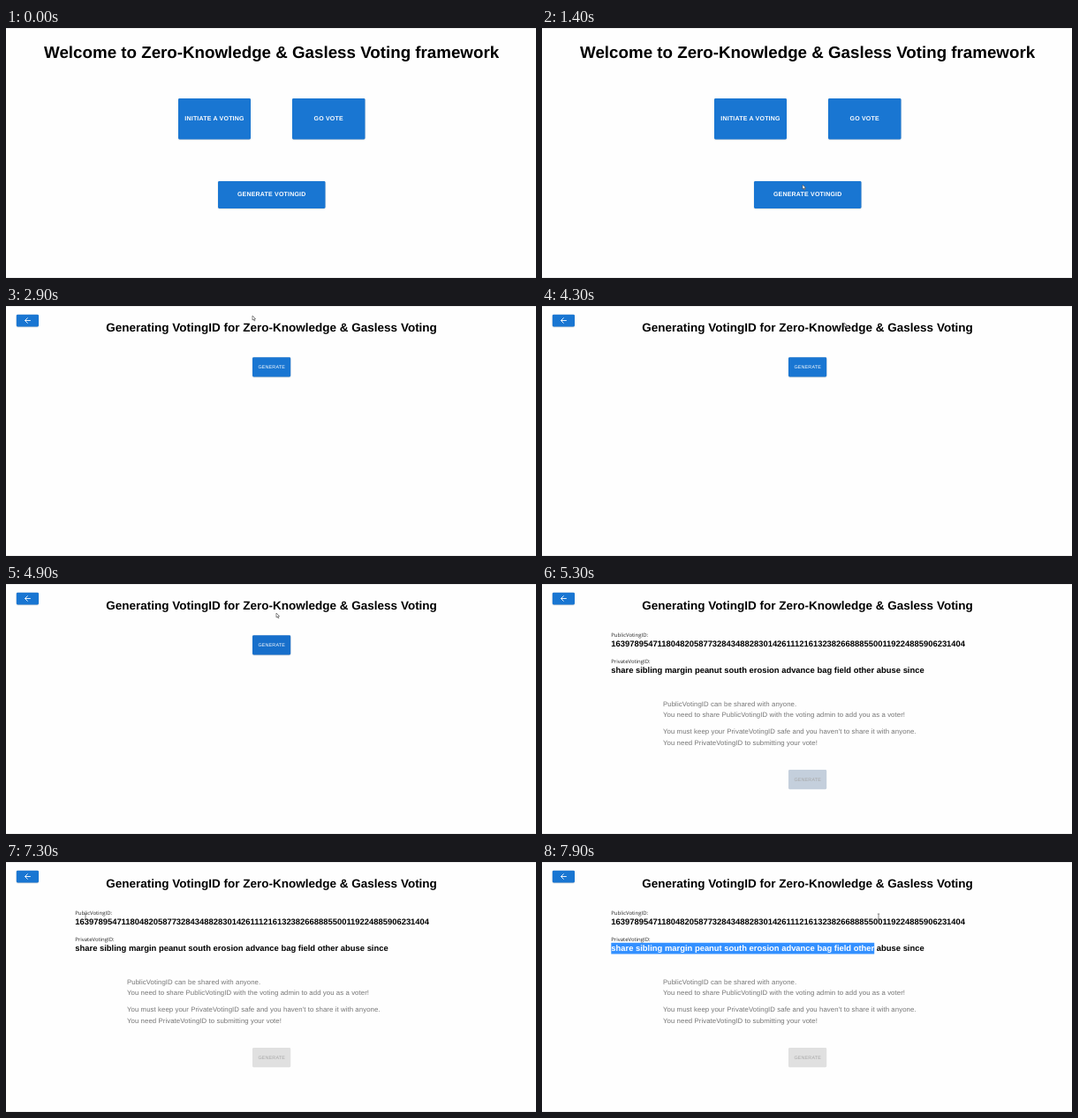
Animation of 600x284 px, one loop 8000 ms. Source, as an HTML page with a canvas:

```html
<!DOCTYPE html>
<html lang="en">
<head>
<meta charset="utf-8">
<style>
  html, body { margin: 0; width: 100%; height: 100%; overflow: hidden; background: #fefefe; }
  canvas { display: block; }
</style>
</head>
<body>
<canvas id="stage" width="600" height="284"></canvas>
<script>
const ctx = document.getElementById('stage').getContext('2d');
const LOOP = 8000, STEP = 100;
const OPEN_PAGE = 2500, GENERATED = 5130;
const SANS = '"Liberation Sans", Arial, sans-serif';
const LABEL = '"Open Sans", sans-serif';
const BLUE = [25, 118, 210], HOVER = [21, 101, 192], DISABLED = [224, 224, 224];
const PUBLIC_ID = '16397895471180482058773284348828301426111216132382668885500119224885906231404';
const PRIVATE_ID = 'share sibling margin peanut south erosion advance bag field other abuse since';

// Pointer keys: [time, x, y]; each list is one visible stretch.
const pointerPaths = [
  [[500, 503, 126], [800, 390, 150], [1100, 270, 182], [1300, 295, 178], [1400, 295, 178],
   [1700, 378, 142], [2000, 300, 150], [2500, 300, 150], [2900, 279, 11],
   [3200, 282, 14], [3400, 240, 20], [3600, 180, -8]],
  [[4300, 342, 19], [4600, 322, 28], [4900, 306, 33], [5200, 300, 32]],
  [[6000, 95, 30], [6100, 110, 30], [6400, 308, 30], [6700, 482, 30], [7000, 482, 32],
   [7300, 90, 62], [7400, 92, 62], [7900, 381, 62], [8000, 420, 62]]
];

const clamp01 = v => Math.max(0, Math.min(1, v));
const mix = (a, b, k) => a.map((v, i) => v + (b[i] - v) * k);
const rgb = c => `rgb(${c.map(Math.round).join(',')})`;
const easeOut = k => 1 - (1 - k) ** 2;

function text(str, x, y, font, color, align = 'left', spacing = 0) {
  ctx.font = font;
  ctx.letterSpacing = spacing + 'px';
  ctx.textRendering = 'geometricPrecision';
  ctx.fillStyle = color;
  ctx.textAlign = align;
  ctx.save();
  ctx.translate(x, y);
  ctx.rotate(1e-4); // an imperceptible turn keeps small glyphs unhinted
  ctx.fillText(str, 0, 0);
  ctx.restore();
}

function button(x, y, w, h, color, shadow = true) {
  ctx.save();
  if (shadow) {
    ctx.shadowColor = 'rgba(0,0,0,0.2)';
    ctx.shadowBlur = 1.5;
    ctx.shadowOffsetY = 0.4;
  }
  ctx.fillStyle = rgb(color);
  ctx.beginPath();
  ctx.roundRect(x, y, w, h, 1.4);
  ctx.fill();
  ctx.restore();
}

function caption(str, x, y, size, weight = '', color = '#fff') {
  text(str, x, y, `${weight} ${size}px ${SANS}`, color, 'center', size * 0.02857);
}

function backButton() {
  button(11.8, 9.7, 25.2, 13.8, BLUE);
  ctx.strokeStyle = '#fff';
  ctx.lineWidth = 0.9;
  ctx.beginPath();
  ctx.moveTo(27.8, 16.5);
  ctx.lineTo(21.5, 16.5);
  ctx.moveTo(24.6, 13.4);
  ctx.lineTo(21.5, 16.5);
  ctx.lineTo(24.6, 19.6);
  ctx.stroke();
}

function selectable(str, y, count) {
  const x = 78.3, font = `bold 9.41px ${SANS}`;
  text(str, x, y, font, '#000');
  if (count <= 0) return;
  const width = ctx.measureText(str.slice(0, count)).width;
  ctx.save();
  ctx.fillStyle = '#3390ff';
  ctx.beginPath();
  ctx.rect(x, y - 9.5, width, 12.6);
  ctx.fill();
  ctx.clip();
  text(str, x, y, font, '#fff');
  ctx.restore();
}

function homePage(t) {
  text('Welcome to Zero-Knowledge & Gasless Voting framework', 300.6, 34.3,
    `bold 18.75px ${SANS}`, '#000', 'center');
  button(195, 80, 82, 46.5, BLUE);
  caption('INITIATE A VOTING', 236, 105.3, 7, 'bold');
  button(324, 80, 82.5, 46.5, BLUE);
  caption('GO VOTE', 365.2, 105.3, 7, 'bold');
  button(240, 174, 121.5, 31, mix(BLUE, HOVER, clamp01((t - 1900) / 250)));
  caption('GENERATE VOTINGID', 300.7, 191.4, 7, 'bold');
}

function results(t) {
  const publicCount = t < 7200 ? Math.round(clamp01((t - 6100) / 570) * PUBLIC_ID.length) : 0;
  const privateCount = Math.round(clamp01((t - 7400) / 500) * 65);
  text('PublicVotingID:', 78.3, 60, `5.95px ${LABEL}`, '#222');
  selectable(PUBLIC_ID, 71, publicCount);
  text('PrivateVotingID:', 78.3, 90.2, `5.95px ${LABEL}`, '#222');
  selectable(PRIVATE_ID, 101.3, privateCount);
  [
    ['PublicVotingID can be shared with anyone.', 138.5],
    ['You need to share PublicVotingID with the voting admin to add you as a voter!', 151],
    ["You must keep your PrivateVotingID safe and you haven't to share it with anyone.", 170],
    ['You need PrivateVotingID to submitting your vote!', 182.5]
  ].forEach(([line, y]) => text(line, 137, y, `7.8px ${SANS}`, '#757575', 'left', 0.073));
}

function generatePage(t) {
  const done = t >= GENERATED;
  const fade = done ? easeOut(clamp01((t - GENERATED) / 270)) : 0;
  const hover = clamp01((t - 4800) / 250);
  const y = done ? 211 : 58.3;
  backButton();
  text('Generating VotingID for Zero-Knowledge & Gasless Voting', 300.6, 29.3,
    `bold 13.5px ${SANS}`, '#000', 'center');
  if (done) results(t);
  button(279, y, 43.2, 22.2, mix(mix(BLUE, HOVER, hover), DISABLED, fade), !done);
  caption('GENERATE', 300.7, y + 12.8, 5.4, '', done ? '#a6a6a6' : '#fff');
}

function pointerAt(t) {
  const path = pointerPaths.find(p => t >= p[0][0] && t <= p[p.length - 1][0]);
  if (!path) return null;
  const i = Math.max(1, path.findIndex(k => k[0] >= t));
  const [a, b] = [path[i - 1], path[i]];
  return mix(a, b, (t - a[0]) / (b[0] - a[0])).slice(1);
}

function pointer(t) {
  const p = pointerAt(t);
  if (!p) return;
  const [x, y] = p;
  ctx.lineWidth = 0.7;
  ctx.strokeStyle = '#555';
  ctx.beginPath();
  if (t >= 6000) {
    ctx.moveTo(x - 1.2, y - 3);
    ctx.lineTo(x + 1.2, y - 3);
    ctx.moveTo(x, y - 3);
    ctx.lineTo(x, y + 3);
    ctx.moveTo(x - 1.2, y + 3);
    ctx.lineTo(x + 1.2, y + 3);
  } else {
    ctx.moveTo(x, y);
    ctx.lineTo(x, y + 5);
    ctx.lineTo(x + 1.2, y + 4);
    ctx.lineTo(x + 2.2, y + 6);
    ctx.lineTo(x + 2.9, y + 5.6);
    ctx.lineTo(x + 2.1, y + 3.7);
    ctx.lineTo(x + 3.6, y + 3.6);
    ctx.closePath();
    ctx.fillStyle = '#fff';
    ctx.fill();
  }
  ctx.stroke();
}

function draw(now) {
  const t = Math.floor((now % LOOP) / STEP) * STEP;
  ctx.fillStyle = '#fefefe';
  ctx.fillRect(0, 0, 600, 284);
  ctx.fillStyle = '#eee';
  ctx.fillRect(0, 0, 600, 1);
  ctx.fillRect(0, 283, 600, 1);
  (t < OPEN_PAGE ? homePage : generatePage)(t);
  pointer(t);
}

let start;
function tick(now) {
  start ??= now;
  draw(now - start);
  requestAnimationFrame(tick);
}
draw(0);
requestAnimationFrame(tick);
</script>
</body>
</html>
```
